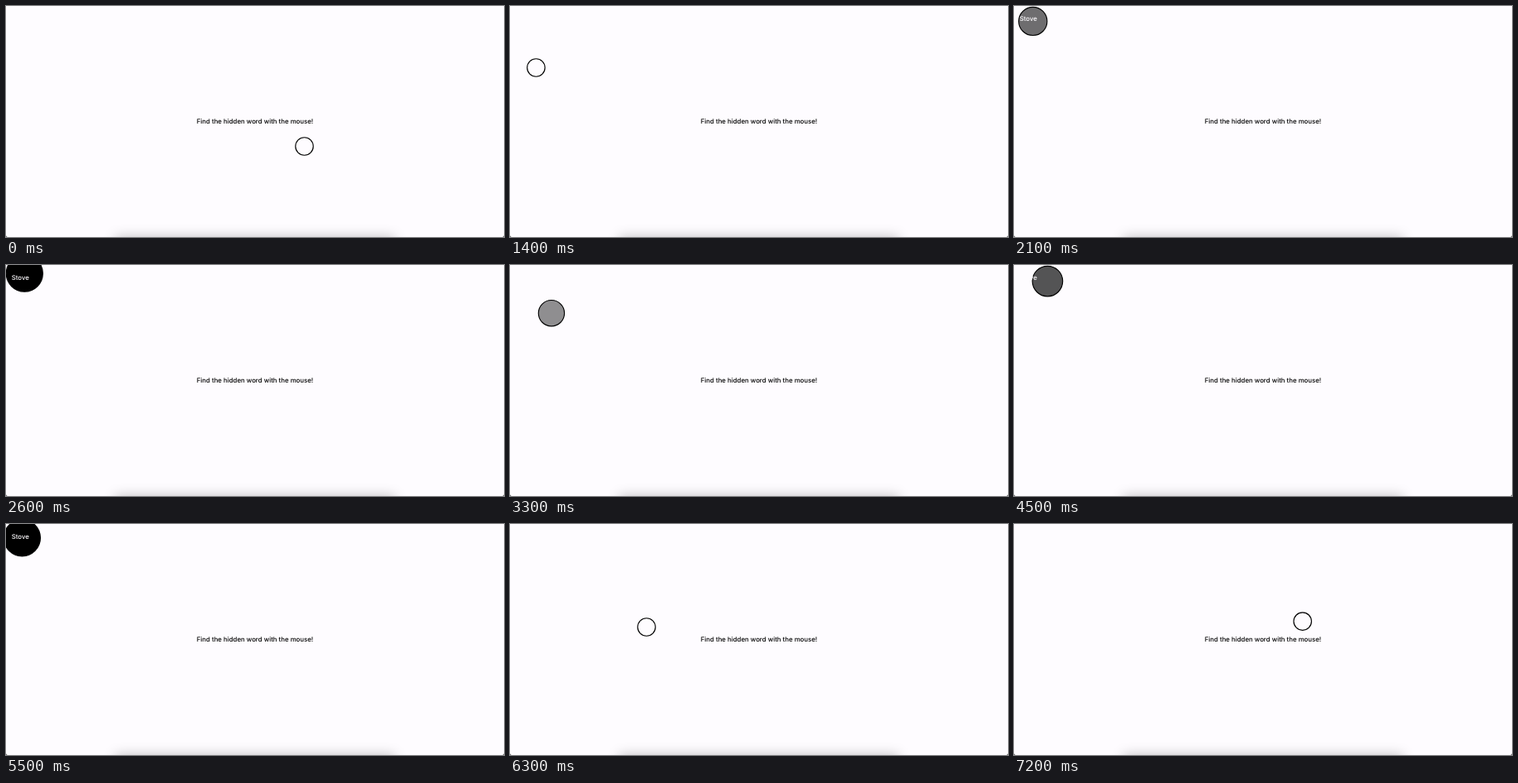
Recreate the animation shown at these times as an HTML page. Size 600 by 279 pixels, loop 7.3 s.

```html
<!DOCTYPE html>
<html lang="en">
<head>
<meta charset="utf-8">
<title>Hidden word</title>
<style>
  html, body { margin: 0; width: 100%; height: 100%; overflow: hidden; background: #fefcff; }
  body { position: relative; }
  svg { position: absolute; left: 0; top: 0; width: 600px; height: 279px; }
  text { font: 500 7.83px Inter, "Open Sans", sans-serif; text-rendering: geometricPrecision; }
  #dock { position: absolute; left: 132px; top: 279px; width: 336px; height: 40px; box-shadow: 0 0 15px rgba(0, 0, 0, .25); }
</style>
</head>
<body>
<div id="dock"></div>
<svg viewBox="0 0 600 279">
  <path d="M0 277q0 2 2 2H0zM600 277q0 2 -2 2h2z" fill="#333"/>
  <text x="300" y="142.4" text-anchor="middle">Find the hidden word with the mouse!</text>
  <circle id="ring" stroke="#000" stroke-width="1.15"/>
  <text x="6.7" y="18" fill="#fefcff">Stove</text>
</svg>
<script>
const LOOP = 7300, STEP = 100, RADIUS = 11.3, LINE = 1.15;
const ring = document.getElementById('ring');

// Flicks of the mouse: time of the first step, number of steps, end point
const home = [359.5, 169.5];
const flicks = [
  [400, 3, 180, 138.5],
  [900, 3, 89, 119.5],
  [1300, 2, 31.4, 74.5],
  [1600, 2, 22.5, 31.7],
  [2000, 4, 23, 8.2],
  [2600, 5, 20, 16.5],
  [3200, 4, 73, 90.3],
  [3700, 2, 143.5, 14.5],
  [3900, 2, 82.5, 25.1],
  [4300, 5, 19.4, 16.8],
  [6000, 4, 164.5, 124.5],
  [6600, 2, 251, 143.5],
  [7000, 2, 334, 100.5],
  [7200, 1, 347.7, 117.6]
];

const ease = k => 1 - (1 - k) ** 1.2;
const onWord = (x, y) => x < 30 && y < 25 ? 1 : 0;

// Position and growth of the pointer; it grows on the way to the word
function pose(t) {
  let [x, y] = home, size = 0;
  for (const [start, steps, toX, toY] of flicks) {
    if (t < start) break;
    const k = ease(Math.min(1, ((t - start) / STEP + 1) / steps));
    x += (toX - x) * k;
    y += (toY - y) * k;
    size += (onWord(toX, toY) - size) * k;
  }
  return { x, y, size };
}

function draw(now) {
  const { x, y, size } = pose(Math.floor(now % LOOP / STEP) * STEP);
  ring.setAttribute('cx', x);
  ring.setAttribute('cy', y);
  ring.setAttribute('r', RADIUS * (1 + size) - LINE / 2);
  ring.setAttribute('fill-opacity', size);
  requestAnimationFrame(draw);
}
draw(performance.now());
</script>
</body>
</html>
```
